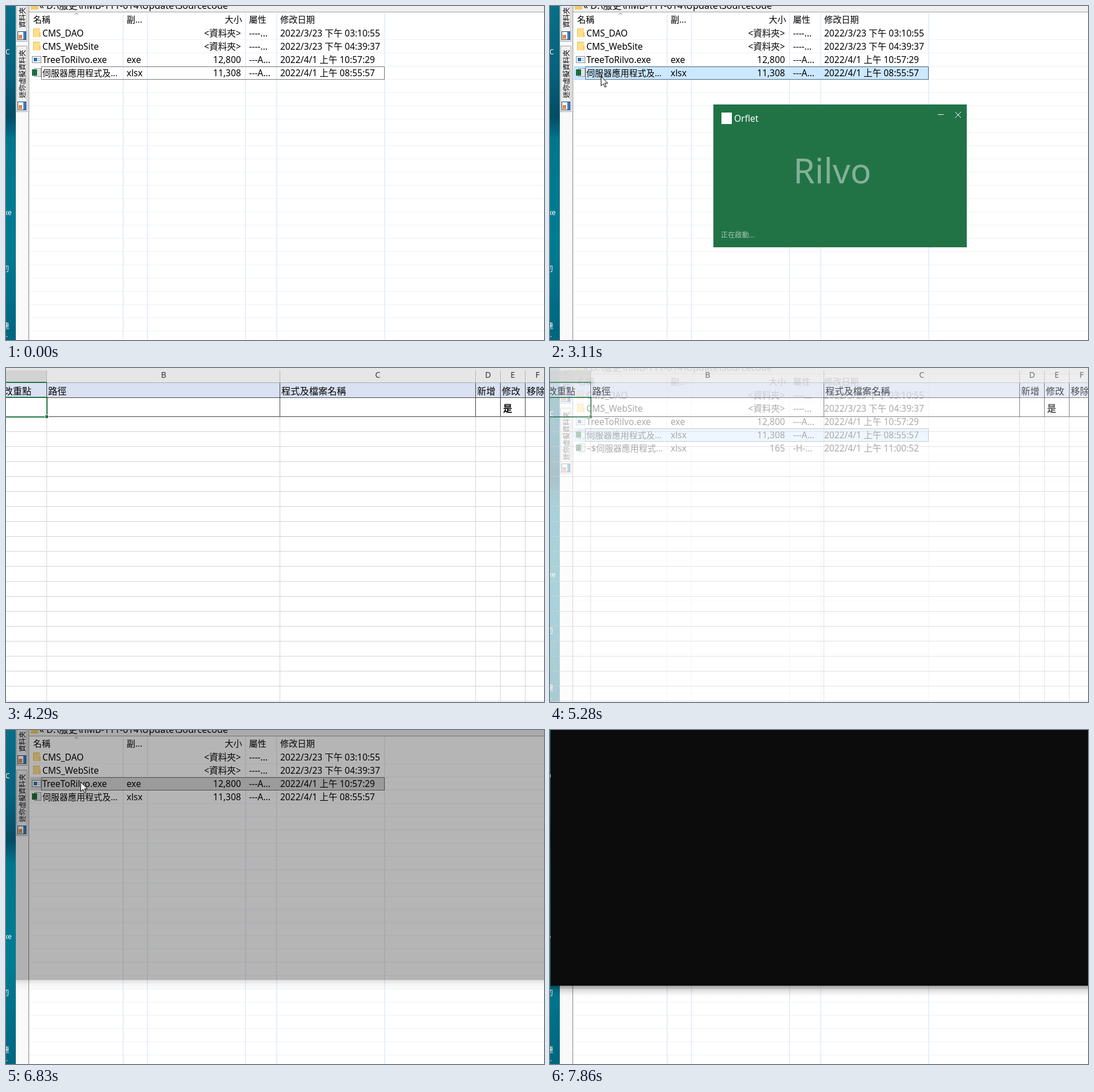
These frames come from a looping animation (932x580 px, 8 s). An HTML page with a canvas:

```html
<!DOCTYPE html>
<html lang="zh-Hant">
<head>
<meta charset="utf-8">
<style>
html, body { margin: 0; width: 100%; height: 100%; overflow: hidden; background: #fff; }
canvas { display: block; }
</style>
</head>
<body>
<canvas id="stage" width="932" height="580"></canvas>
<script>
const W = 932, H = 580, LOOP = 8000, TICK = 67.6;
const ctx = document.getElementById('stage').getContext('2d');
const UI = '"Noto Sans", "Noto Sans CJK TC", "Noto Sans CJK", sans-serif';
const COLUMNS = [203, 245, 415, 469, 656];
const FILES = [
  ['folder', 'CMS_DAO', '', '<資料夾>', '----...', '2022/3/23 下午 03:10:55'],
  ['folder', 'CMS_WebSite', '', '<資料夾>', '----...', '2022/3/23 下午 04:39:37'],
  ['exe', 'TreeToRilvo.exe', 'exe', '12,800', '---A...', '2022/4/1 上午 10:57:29'],
  ['sheet', '伺服器應用程式及...', 'xlsx', '11,308', '---A...', '2022/4/1 上午 08:55:57'],
  ['sheet', '~$伺服器應用程式...', 'xlsx', '165', '-H-...', '2022/4/1 上午 11:00:52']
];
// Pointer tracks: [time, x, y]
const TRACKS = [
  [[790, 330, 404], [1000, 215, 265], [1200, 128, 165], [1420, 92, 125], [1490, 88, 122], [3240, 88, 122]],
  [[3240, 93, 122], [3730, 93, 122], [3860, 62, 112], [4000, 200, 100], [4250, 610, 68]],
  [[5400, 720, -20], [5560, 400, 190], [5678, 218, 188], [5746, 156, 118], [5960, 129, 90],
   [7450, 129, 90], [7600, 152, 70], [7850, 154, -22]]
];

const clamp = v => Math.max(0, Math.min(1, v));

function box(color, x, y, w, h) {
  ctx.fillStyle = color;
  ctx.fillRect(x, y, w, h);
}

function frame(color, x, y, w, h, dash = []) {
  ctx.strokeStyle = color;
  ctx.lineWidth = 1;
  ctx.setLineDash(dash);
  ctx.strokeRect(x + .5, y + .5, w - 1, h - 1);
  ctx.setLineDash([]);
}

function text(str, x, y, size = 15.4, color = '#000', align = 'left', weight = 400) {
  ctx.font = `${weight} ${size}px ${UI}`;
  ctx.fillStyle = color;
  ctx.textAlign = align;
  ctx.fillText(str, x, y);
}

function polygon(points, fill, stroke) {
  ctx.beginPath();
  points.forEach(([x, y]) => ctx.lineTo(x, y));
  ctx.closePath();
  ctx.fillStyle = fill;
  ctx.fill();
  if (stroke) {
    ctx.strokeStyle = stroke;
    ctx.lineWidth = 1;
    ctx.stroke();
  }
}

function position(track, t) {
  if (t < track[0][0]) return null;
  for (let i = 1; i < track.length; i++) {
    const [t0, x0, y0] = track[i - 1], [t1, x1, y1] = track[i];
    if (t <= t1) {
      const p = (t - t0) / (t1 - t0);
      return [Math.round(x0 + (x1 - x0) * p), Math.round(y0 + (y1 - y0) * p)];
    }
  }
  return null;
}

function arrow([x, y]) {
  const shape = [[0, 0], [0, 16], [4, 12.5], [6.7, 18.5], [9, 17.5], [6.4, 11.6], [11.5, 11.6]];
  polygon(shape.map(([a, b]) => [x + a + .5, y + b + .5]), '#fff', '#000');
}

function cross([x, y]) {
  box('#000', x - 3, y - 9, 6, 18);
  box('#000', x - 9, y - 3, 18, 6);
  box('#fff', x - 2, y - 8, 4, 16);
  box('#fff', x - 8, y - 2, 16, 4);
}

function icon(kind, y) {
  if (kind === 'folder') {
    box('#e8bf5c', 47, y - 8, 12, 15);
    box('#ffdf8b', 48, y - 7, 11, 14);
    box('#f5cf74', 57, y - 1, 3, 8);
  } else if (kind === 'exe') {
    box('#fff', 46, y - 6, 15, 12);
    frame('#7b8794', 45, y - 6, 16, 12);
    box('#2473b8', 48, y - 3, 6, 6);
    box('#98a4b0', 55, y - 2, 4, 1);
    box('#98a4b0', 55, y + 1, 4, 1);
  } else {
    box('#fff', 49, y - 8, 12, 15);
    frame('#8c8c8c', 49, y - 8, 12, 15);
    for (let i = 0; i < 4; i++) box('#a9b5ac', 55, y - 5 + i * 3, 4, 1);
    box('#1e6b41', 45, y - 6, 9, 11);
  }
}

function tab(label, top, bottom) {
  box('#f0f0f0', 18, top, 19, bottom - top);
  frame('#a5a5a5', 18, top, 19, bottom - top);
  ctx.save();
  ctx.translate(33, bottom - 24);
  ctx.rotate(-Math.PI / 2);
  text(label, 0, 0, 12);
  ctx.restore();
  box('#fff', 20, bottom - 18, 15, 15);
  frame('#24456f', 20, bottom - 18, 15, 15);
  box('#2f7fd0', 30, bottom - 17, 4, 13);
  box('#e08a3c', 22, bottom - 12, 6, 7);
}

function desktop() {
  const g = ctx.createLinearGradient(0, 0, 0, H);
  [[0, '#0a6e87'], [.2, '#07627c'], [.33, '#004c63'], [.4, '#00768d'], [.7, '#007c92'], [1, '#00657f']]
    .forEach(([p, c]) => g.addColorStop(p, c));
  box(g, 0, 0, 17, H);
  text('C', -1, 84, 12, '#fff');
  text('xe', -3, 363, 12, '#fff');
  text('切', -7, 461, 12, '#fff');
  text('連', -6, 560, 12, '#fff');
  text('.', 0, 575, 12, '#fff');
}

function highlight(row, state) {
  const y = 36 + row * 23;
  const fill = { hover: '#e5f3ff', selected: '#cce8ff', inactive: '#d9d9d9' }[state];
  if (fill) box(fill, 42, y, 614, 23);
  if (state === 'selected') frame('#99d1ff', 42, y, 614, 23);
  return () => {
    if (state === 'hover') frame('#3d6f9c', 42, y + 1, 613, 21, [1, 1]);
    else frame('#000', 61, y, 595, 23, [1, 1]);
  };
}

function fileList(t, pointer) {
  desktop();
  box('#f9f9f9', 17, 0, 22, H);
  tab('資料夾', -30, 62);
  tab('迷你虛擬資料夾', 69, 184);
  box('#fff', 39, 0, W, H);
  box('#f0f0f0', 39, 0, W, 10);
  box('#a0a0a0', 39, 10, W, 1);
  box('#808080', 39, 0, 1, H);
  box('#f3ca66', 43, 0, 13, 6);
  text('«', 58, 5, 16);
  text('D:\\服更\\nMB-111-014\\Update\\Sourcecode', 70, 5, 16);

  for (let y = 58; y < H; y += 23) box('#eff1f4', 41, y, W, 1);
  COLUMNS.forEach(x => box('#e7f0fa', x - 1, 12, 2, H));
  polygon([[118, 16], [122, 12], [126, 16], [122, 13.5]], '#777');
  text('名稱', 47, 29, 15);
  text('副...', 209, 29, 15);
  text('大小', 409, 29, 15, '#000', 'right');
  text('屬性', 421, 29, 15);
  text('修改日期', 475, 29, 15);

  const hovered = pointer ? Math.floor((pointer[1] - 36) / 23) : -1;
  const outlines = [];
  if (t < 1690) outlines.push(highlight(3, hovered === 3 ? 'hover' : 'focus'));
  else if (t < 6360) {
    outlines.push(highlight(3, 'selected'));
    if (t > 5280 && hovered === 2) highlight(2, 'hover');
  } else outlines.push(highlight(2, t < 6760 ? 'selected' : 'inactive'));

  const locked = t >= 3240 && t < 5890;
  FILES.slice(0, locked ? 5 : 4).forEach(([kind, name, ext, size, attr, date], i) => {
    const y = 47 + i * 23, base = y + 6;
    icon(kind, y);
    text(name, 63, base, kind === 'sheet' ? 14.8 : 15.4);
    text(ext, 209, base);
    text(size, 407, base, 15.4, '#000', 'right');
    text(attr, 421, base);
    text(date, 475, base);
  });
  outlines.forEach(draw => draw());
}

function splash(t) {
  ctx.save();
  ctx.globalAlpha = clamp((t - 2480) / 200);
  box('#217346', 283, 171, 439, 248);
  box('#fff', 297, 185, 18, 20);
  text('Orflet', 319, 201, 15.5, '#fff');
  text('Rilvo', 489, 308, 60, '#84b196', 'center', 300);
  text('正在啟動...', 296, 402, 12.2, '#a6c7b5');
  box('#fff', 672, 188, 10, 1);
  ctx.strokeStyle = '#fff';
  ctx.lineWidth = 1;
  ctx.beginPath();
  ctx.moveTo(702, 184); ctx.lineTo(712, 194);
  ctx.moveTo(712, 184); ctx.lineTo(702, 194);
  ctx.stroke();
  ctx.restore();
}

function worksheet(t) {
  const edges = [70, 474, 813, 856, 899];
  box('#fff', 0, 0, W, H);
  box('#e6e6e6', 0, 0, W, 25);
  if (t < 3310) return;
  box('#d2d2d2', 0, 4, 70, 21);
  box('#ababab', 0, 25, W, 1);
  box('#d9e1f2', 0, 26, W, 25);
  for (let y = 110; y < H; y += 26) box('#d4d4d4', 0, y, W, 1);
  edges.forEach(x => {
    box('#b5b5b5', x, 4, 1, 21);
    box('#404040', x, 26, 1, 59);
    box('#d4d4d4', x, 85, 1, H);
  });
  box('#404040', 0, 51, W, 1);
  box('#404040', 0, 84, W, 1);
  [['B', 273], ['C', 644], ['D', 835], ['E', 878], ['F', 921]]
    .forEach(([s, x]) => text(s, x, 17, 14, '#333', 'center'));
  [['改重點', -4], ['路徑', 73], ['程式及檔案名稱', 477], ['新增', 816], ['修改', 859], ['移除', 902]]
    .forEach(([s, x]) => text(s, x, 46, 16));
  text('是', 861, 76, 16, '#000', 'left', 700);
  box('#217346', 0, 24, 71, 2);
  box('#217346', 0, 50, 72, 2);
  box('#217346', 0, 84, 68, 2);
  box('#217346', 70, 50, 2, 32);
  box('#fff', 67, 81, 7, 7);
  box('#217346', 68, 82, 5, 5);
}

function consoleWindow(t) {
  const p = clamp((t - 6767) / 200);
  if (!p) return;
  const left = 1 + 23 * (1 - p), bottom = 444 - 14 * (1 - p);
  ctx.save();
  ctx.globalAlpha = p;
  const g = ctx.createLinearGradient(0, bottom, 0, bottom + 18);
  g.addColorStop(0, 'rgba(0,0,0,.4)');
  g.addColorStop(.4, 'rgba(0,0,0,.13)');
  g.addColorStop(1, 'rgba(0,0,0,0)');
  box(g, left, bottom, W, 18);
  box('#0c0c0c', left, 0, W, bottom);
  ctx.restore();
}

function render(t) {
  const q = Math.floor(t / TICK) * TICK;
  const [pointer, cell, late] = TRACKS.map(track => position(track, q));
  const open = t >= 3240 && t < 5440;
  const current = t < 3240 ? pointer : t > 5280 ? late : null;

  ctx.clearRect(0, 0, W, H);
  fileList(t, current);
  if (t >= 2500 && t < 3240) splash(q);
  if (open) {
    ctx.globalAlpha = t < 5280 ? 1 : clamp(1 - (q - 5205) / 200);
    worksheet(t);
    ctx.globalAlpha = 1;
    if (cell && t < 4290) cross(cell);
  }
  consoleWindow(q);
  if (current) arrow(current);
}

function loop(now) {
  render(now % LOOP);
  requestAnimationFrame(loop);
}
requestAnimationFrame(loop);
</script>
</body>
</html>
```
